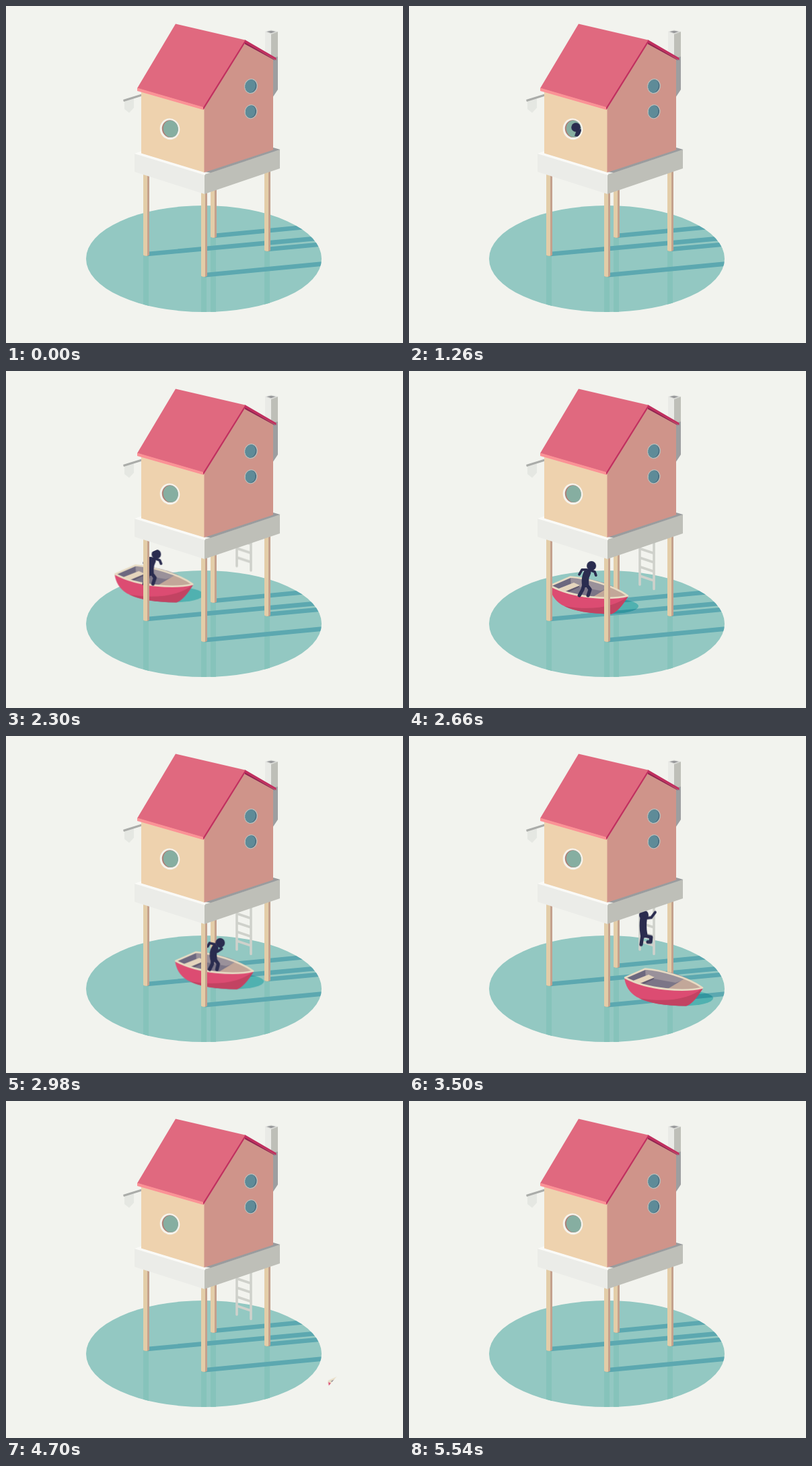
These frames come from a looping animation (590 px wide and 500 px high, 6540 ms). An HTML page without scripts:

```html
<!DOCTYPE html>
<html lang="en">
<head>
<meta charset="utf-8">
<title>House on stilts</title>
<style>
html, body { margin: 0; width: 100%; height: 100%; overflow: hidden; background: #f2f3ee; }
svg { display: block; width: 590px; height: 500px; }

.sail, .walk, .climb, .ladder, .peek, .walker *, .climb-legs {
  animation: 6540ms linear -8ms infinite;
}
.sail { animation-name: sail; }
.ladder { animation-name: ladder; }
.peek { animation-name: peek; }
.climb { animation-name: climb; }
.climb-legs { animation-name: climb-legs; }
.walker { animation: board 6540ms step-end -8ms infinite; }
.walker .head { animation-name: walk-head; }
.walker .torso { animation-name: walk-torso; }
.walker .legs { animation-name: walk-legs; }
.walker .arms { animation-name: walk-arms; }

.limb { fill: none; stroke: #2a2c4f; stroke-linecap: round; stroke-linejoin: round; }
.torso { stroke-width: 10.5px; }
.legs { stroke-width: 5.2px; }
.arms { stroke-width: 3.8px; }
.head { fill: #2a2c4f; }

/* constant drift, held for 40 ms at a time */
@keyframes sail {
  0%, 19.878% { transform: translate(-290.8px, -104.9px); animation-timing-function: steps(90); }
  74.924%, 100% { transform: translate(185.1px, 66.8px); }
}
@keyframes ladder {
  0%, 29.97% { transform: translateY(-76px); animation-timing-function: ease-in-out; }
  39.144%, 75.535% { transform: none; animation-timing-function: ease-in-out; }
  84.709%, 100% { transform: translateY(-76px); }
}
@keyframes peek {
  0%, 7.3% { transform: translateX(17px); animation-timing-function: ease-in-out; }
  13.15%, 19.266% { transform: none; animation-timing-function: ease-in-out; }
  24.77%, 100% { transform: translateX(17px); }
}
@keyframes board {
  0% { visibility: visible; }
  48.624%, 100% { visibility: hidden; }
}
@keyframes walk-head {
  0%, 40.673% { transform: none; }
  45.566% { transform: translate(5px, 3px); }
  48.624%, 100% { transform: translate(5px, -6px); }
}
@keyframes walk-torso {
  0%, 40.673% { d: path("M376 339Q372 346 373 356"); }
  45.566% { d: path("M379 340Q375 346 377 355"); }
  48.624%, 100% { d: path("M384 334Q382 342 382 354"); }
}
@keyframes walk-legs {
  0%, 40.673% { d: path("M371 356L369 364L364 373M374 356L380 364L377 373"); }
  45.566% { d: path("M375 355L375 363L371 371M379 356L384 363L382 371"); }
  48.624%, 100% { d: path("M381 355L381 363L378 371M383 356L388 363L386 371"); }
}
@keyframes walk-arms {
  0%, 40.673% { d: path("M375 335L368 335L364 342M379 335L387 338L389 343"); }
  45.566% { d: path("M379 334L371 332L368 337M386 336L389 341L382 346"); }
  48.624%, 100% { d: path("M383 332L377 332L375 338M388 331L397 328L402 318"); }
}
@keyframes climb {
  0%, 48.6% { transform: translateY(34px); visibility: hidden; }
  48.624% { transform: translateY(34px); visibility: visible; animation-timing-function: ease-out; }
  49.847% { transform: translateY(4px); }
  53.517% { transform: none; }
  58.41% { transform: translateY(-21px); }
  63.303% { transform: translateY(-39px); }
  66.36% { transform: translateY(-62px); visibility: visible; }
  66.4%, 100% { transform: translateY(-62px); visibility: hidden; }
}
@keyframes climb-legs {
  0%, 53.517% { d: path("M347 296L346 304L345 310M351 297L360 299L359 306L355 306"); }
  58.41% { d: path("M347 294L342 300L345 306M351 297L356 304L358 310L357 310"); }
  63.303%, 100% { d: path("M347 296L346 304L346 309M351 291L358 286L358 292L355 293"); }
}
</style>
</head>
<body>
<svg viewBox="0 0 590 500" xmlns="http://www.w3.org/2000/svg">
  <defs>
    <clipPath id="pool"><ellipse cx="294" cy="375" rx="175" ry="79"/></clipPath>
    <clipPath id="passage"><path d="M82 327L400 189H590V278L503 390L494 406L473 430L440 471H82Z"/></clipPath>
    <clipPath id="pane"><ellipse cx="244.8" cy="182.3" rx="11" ry="12.6" transform="rotate(-12 244.8 182.3)"/></clipPath>
    <g id="stilt">
      <path d="M0 0H9V127Q5 130 0 127Z" fill="#c4a18d"/>
      <path d="M0 0H6V128Q3 129 0 127Z" fill="#e3cda8"/>
    </g>
    <g id="porthole" transform="rotate(12)">
      <ellipse rx="10" ry="11.3" fill="#b7bebb"/>
      <ellipse rx="8.5" ry="9.9" fill="#4a6a7e"/>
      <ellipse cx="-.8" rx="7.7" ry="9.7" fill="#5e8b98"/>
    </g>
  </defs>

  <!-- water -->
  <g clip-path="url(#pool)">
    <path fill="#93c8c2" d="M119 296H469V454H119Z"/>
    <path fill="#86c3bb" d="M204 369h8v90h-8zM290 400h8v60h-8zM304 342h8v118h-8zM384 362h8v90h-8z"/>
    <path stroke="#5ca8b0" stroke-width="6.6" d="M210 368L470 344M308 341L450 327.5M388 361L474 353M295 399.3L475 382"/>
  </g>
  <g clip-path="url(#pool)" style="mix-blend-mode:multiply">
    <ellipse class="sail" cx="406" cy="389" rx="46" ry="11.5" fill="#8ae2e7"/>
  </g>

  <!-- far stilts and ladder -->
  <use href="#stilt" x="304" y="215.5"/>
  <use href="#stilt" x="384" y="235.5"/>
  <path class="ladder" fill="none" stroke="#cfd1cb" stroke-width="3.6" stroke-linecap="round"
    d="M343 245V317M364 240V323.5M343 263.5l21 7M343 277l21 7M343 290.5l21 7M343 304l21 7"/>

  <!-- boat -->
  <g clip-path="url(#passage)">
    <g class="sail">
      <path fill="#dc4c72" d="M320 358Q322 377 338 387Q362 400 412 400.5Q423 397 437 373Z"/>
      <path fill="#c24362" d="M342 389Q405 399 437 374Q423 397 412 400.5Q364 400 342 389Z"/>
      <path fill="#7b7587" d="M321 358L351 345C373 346 415 358 436 373C410 380 355 377 321 358Z"/>
      <path fill="#9a919a" d="M351 345C373 346 400 353 415 360L396 366L352 358Z"/>
      <path fill="#6d687f" d="M322 358L351 346V357L334 365Z"/>
      <path fill="#c2a799" d="M383 376L411 359Q426 365 436 373Q410 379 383 376Z"/>
      <path fill="#60596f" d="M342 367L365 358L363 361L346 369Z"/>
      <path fill="#e5d5bd" d="M333 363L356 354L365 358L341 368Z"/>
      <path fill="none" stroke="#e8dcc4" stroke-width="2.6" stroke-linejoin="round"
        d="M321 358.500L351 345.500C373 347 415 358 436 373.500C410 380 355 377 321 358.500Z"/>
      <g class="walker">
        <path class="limb legs"/>
        <path class="limb torso"/>
        <path class="limb arms"/>
        <circle class="head" cx="382" cy="329" r="7"/>
      </g>
    </g>
  </g>

  <g class="climb">
    <path class="limb legs climb-legs"/>
    <path class="limb torso" d="M348.500 272Q347 284 349 295"/>
    <path class="limb arms" d="M352 271L360 270L366 262"/>
    <circle class="head" cx="349" cy="266" r="7"/>
  </g>

  <!-- near stilts and deck -->
  <use href="#stilt" x="204" y="242.500"/>
  <use href="#stilt" x="290" y="273.500"/>
  <path fill="#ebece8" d="M191 219L295 250V279L191 246Z"/>
  <path fill="#bebfb8" d="M295 250L407 213V241L295 279Z"/>
  <path fill="#fafaf7" d="M191 219L202 215L296 246V251Z"/>
  <path fill="#9a9c9e" d="M295 246L397 210L407.500 213L304 247.500Z"/>

  <!-- sign -->
  <path fill="#e5e7e2" d="M176 141L190 137V151L183 158.500L176 153Z"/>
  <path stroke="#aaaca9" stroke-width="3" d="M174.500 140.500L202 132"/>

  <!-- chimney -->
  <path fill="#e9eae6" d="M385 38L394.500 41V80L385 70Z"/>
  <path fill="#bebfb8" d="M394 41L404 38V82H394Z"/>
  <path fill="#9d9ea0" d="M396 77L404 75V124L396 136Z"/>
  <path fill="#dcddd9" d="M385 38L394 35.500L404 38L394.500 42Z"/>
  <path fill="#97989a" d="M387.500 38L394 36.800L400.500 38L394 40.300Z"/>

  <!-- house -->
  <path fill="#eed2ae" d="M201 122L295 150V247L201 218.500Z"/>
  <path fill="#cf948a" d="M294.500 152L355 52L397 77V213.500L294.500 247Z"/>
  <path fill="#8f2350" d="M355 53L398 79L400 81L355 56.500Z"/>
  <path fill="#c0305f" d="M292.500 150L355 50L401.500 77V80.500L355.500 54.500L293.500 154Z"/>
  <path fill="#e0697f" d="M252 26.500L355.500 50.500L293 150.500L195 122Z"/>
  <path fill="#fb9296" d="M195 121.500L293 150V154L195 126Z"/>
  <use href="#porthole" x="364" y="119"/>
  <use href="#porthole" transform="translate(364 156.800) scale(.95)"/>

  <!-- round window -->
  <g transform="rotate(-12 243.500 182.500)">
    <ellipse cx="243.500" cy="182.500" rx="14.800" ry="15.800" fill="#f5f3ec"/>
    <ellipse cx="243.800" cy="182.300" rx="11.900" ry="12.900" fill="#ad7e75"/>
  </g>
  <g clip-path="url(#pane)">
    <path fill="#86aea1" d="M230 165h30v35h-30z"/>
    <g class="peek" fill="#2a2c4f">
      <circle cx="248" cy="180" r="6.800"/>
      <path d="M249 184L246 193L260 196V182Z"/>
    </g>
  </g>
</svg>
</body>
</html>
```
